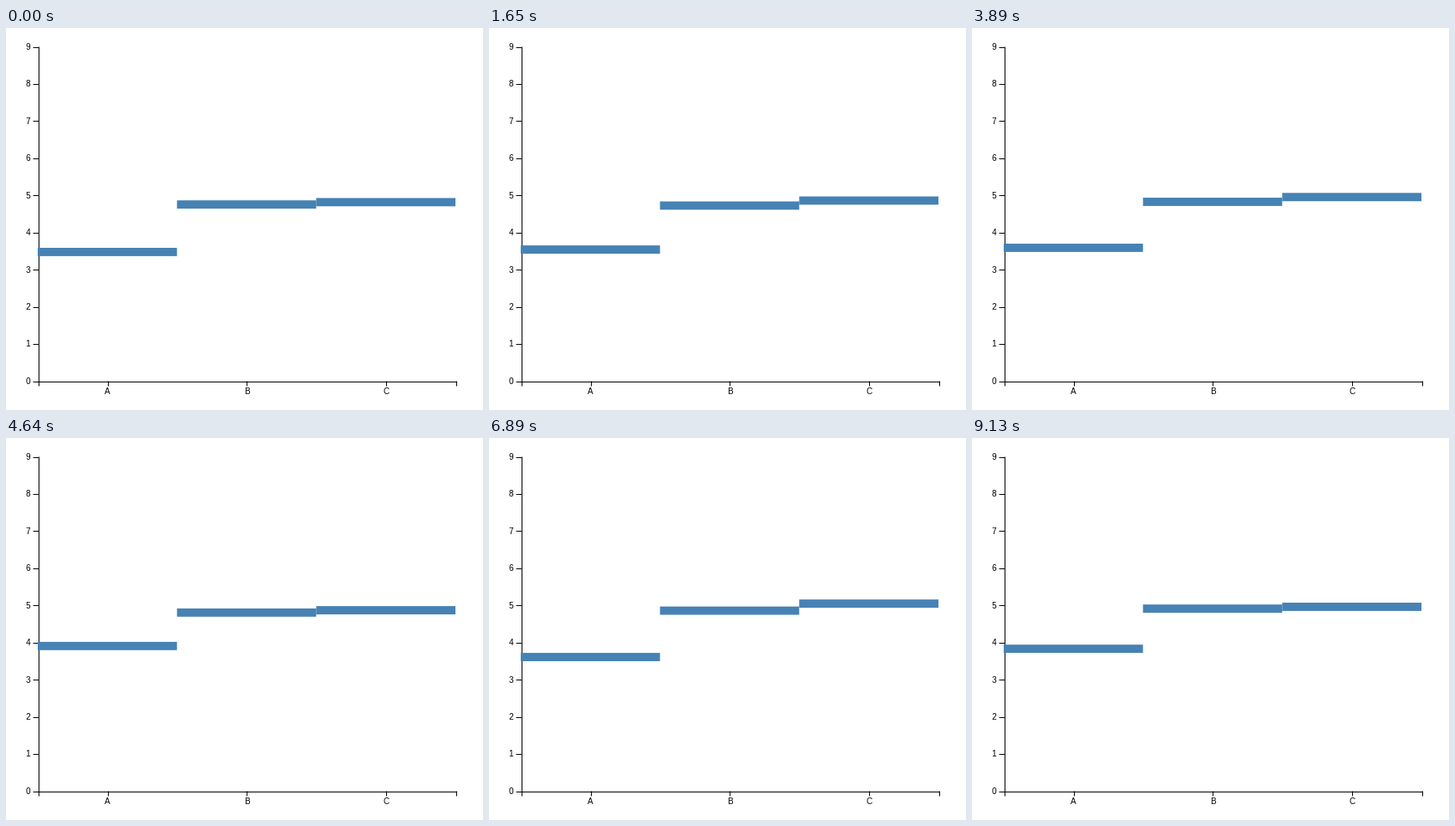
Write a matplotlib script that moves like this. It is 571x457 px and loops after 9730 ms.

```python
import matplotlib.pyplot as plt
import numpy as np
from matplotlib.animation import FuncAnimation

W, H, DPI = 571, 457, 100
LEFT, TOP, RIGHT, BOTTOM = 38, 22, 538, 422
BAR = 9.9
STEP, LOOP = 35, 9730
PX = 72 / DPI

# start time in ms, then the top edge of bars A, B and C
STATES = np.array([
    (0, 263.0, 206.2, 203.4),
    (150, 265.0, 204.5, 201.3),
    (900, 283.0, 203.0, 196.4),
    (1650, 260.1, 207.5, 201.5),
    (2400, 264.0, 203.5, 203.0),
    (3150, 246.1, 197.5, 202.6),
    (3890, 258.0, 203.0, 197.3),
    (4640, 243.9, 203.9, 201.1),
    (5390, 250.0, 204.5, 202.0),
    (6140, 253.0, 197.3, 202.0),
    (6890, 257.1, 201.6, 193.2),
    (7640, 257.0, 203.0, 195.0),
    (8380, 258.3, 205.2, 193.8),
    (9130, 247.2, 199.2, 197.0),
])

plt.rcParams["font.family"] = "Liberation Sans"
fig = plt.figure(figsize=(W / DPI, H / DPI), dpi=DPI, facecolor="white")
ax = fig.add_axes([0, 0, 1, 1])
ax.set(xlim=(0, W), ylim=(H, 0))
ax.axis("off")


def line(x0, y0, x1, y1):
    ax.plot([x0, x1], [y0, y1], color="black", lw=PX, snap=True,
            solid_capstyle="butt", zorder=1)


def label(x, y, text, ha):
    ax.text(x, y, text, ha=ha, va="baseline", fontsize=10 * PX, color="black")


# y axis
line(LEFT + 0.5, TOP, LEFT + 0.5, BOTTOM + 1)
for value in range(10):
    y = BOTTOM + 0.5 - value * (BOTTOM - TOP) / 9
    line(LEFT - 6, y, LEFT + 1, y)
    label(LEFT - 9, y + 3.4, str(value), "right")

# x axis
band = (RIGHT - LEFT) / 3
line(LEFT, BOTTOM + 0.5, RIGHT + 1, BOTTOM + 0.5)
for x in (LEFT, RIGHT):
    line(x + 0.5, BOTTOM, x + 0.5, BOTTOM + 6)
for i, name in enumerate("ABC"):
    x = LEFT + (i + 0.5) * band
    line(x + 0.2, BOTTOM, x + 0.2, BOTTOM + 6)
    label(x, BOTTOM + 16.1, name, "center")

bars = [
    ax.add_patch(plt.Rectangle((LEFT + i * band, top), band, BAR, lw=0,
                               fc="steelblue", snap=False, zorder=3))
    for i, top in enumerate(STATES[0, 1:])
]


def update(k):
    t = (k + 1) * STEP - 1
    row = np.searchsorted(STATES[:, 0], t, side="right") - 1
    for bar, top in zip(bars, STATES[row, 1:]):
        bar.set_y(top)
    return bars


anim = FuncAnimation(fig, update, frames=LOOP // STEP, interval=STEP,
                     repeat=True, repeat_delay=0, blit=False)
plt.show()
```
